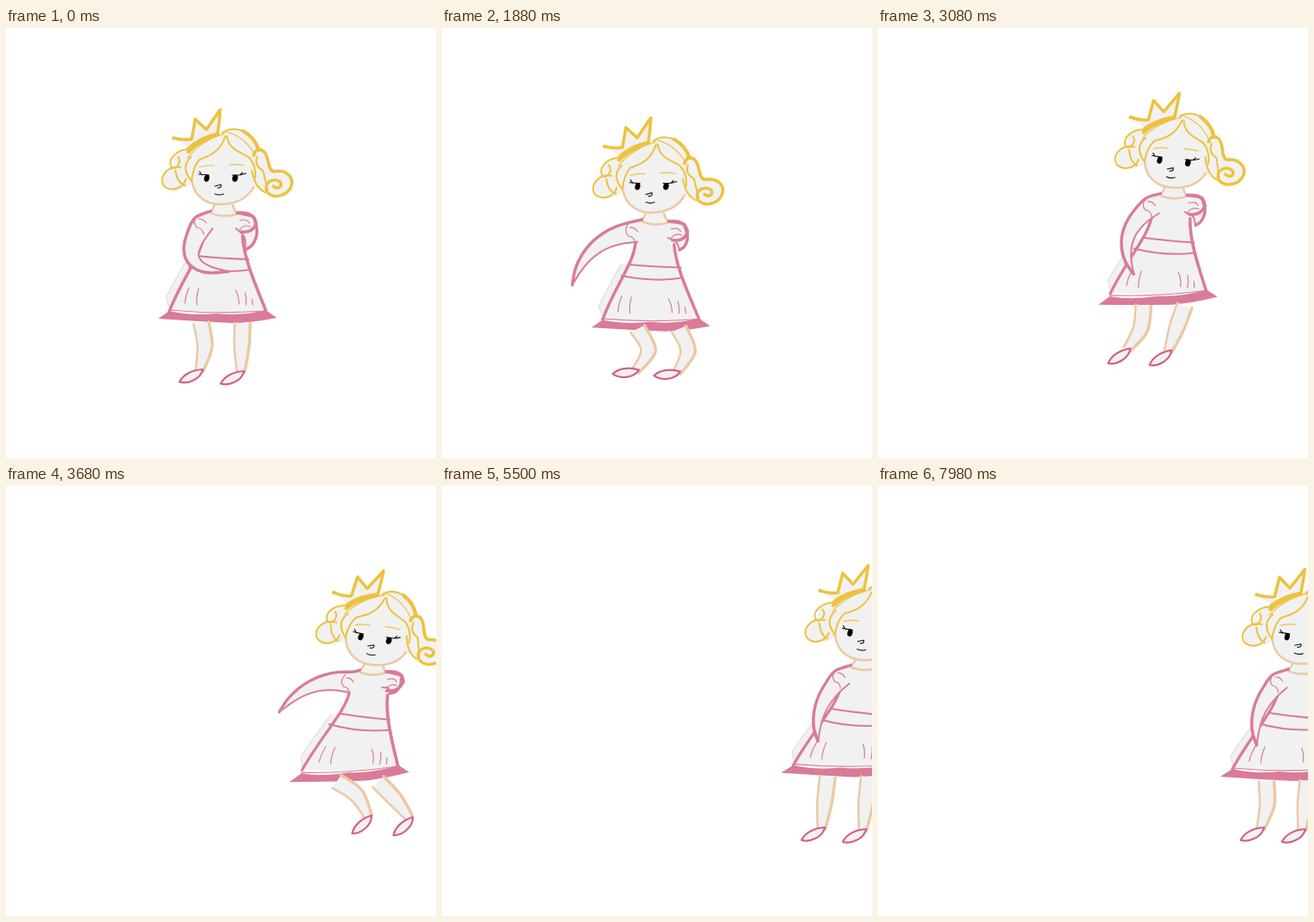
An HTML page for the animation above (8 s loop, 500 by 500 pixels).

```html
<!DOCTYPE html>
<html lang="en">
<head>
<meta charset="utf-8">
<title>Princess leap</title>
<style>
  html, body { margin: 0; width: 100%; height: 100%; overflow: hidden; background: #fff; }
  svg { display: block; width: 100vw; height: 100vh; }
  path { fill: none; stroke-linecap: round; stroke-linejoin: round; }
  .fill { fill: #f1f1f1; }
  .pink { stroke: #d97b99; stroke-width: 2; }
  .gold { stroke: #edc23c; stroke-width: 2; }
  .skin { stroke: #ebc9a3; stroke-width: 2.5; }
  .shoe { stroke: #d2608a; stroke-width: 2.2; fill: #f1f1f1; }
  .ink { stroke: #111; stroke-width: 1.1; }
  .ghost { stroke: #dcdcdc; stroke-width: 1; }
  .thin { stroke-width: 1.2; }
  .thick { stroke-width: 3.5; }
  .bold { stroke-width: 4.2; }
  .hem { fill: #d97b99; }
</style>
</head>
<body>
<svg viewBox="0 0 500 500">
  <g id="torso">
    <path class="fill" d="M243 204L238 214L222 220L224 235L230 241L224 264L211 265L186 312L190 329L302 331L283 270L275 242L287 236L287 220L269 215L264 204Z"/>
    <path class="ghost" d="M213 265C202 285 190 303 186 314L189 323"/>
    <path class="skin" d="M242 205Q242 211 237 213M264 206Q265 212 269 215M236 214Q251 222 270 216"/>
    <path id="waist" class="pink" d="M222 265Q250 268 282 269M213 278Q250 286 284 281"/>
    <path class="pink thick" d="M230 240C228 263 205 291 190 329M275 242C276 266 289 296 302 328"/>
    <path class="pink thin" d="M213 302Q209 310 208 320M224 303Q221 313 222 322M267 305Q271 312 271 321M278 308Q280 315 279 322M286 315L287 322"/>
    <g id="hem">
      <path class="hem" d="M177 338L190 329Q215 335 245 332Q275 335 302 328L315 337Q285 343 262 343Q220 341 177 338Z"/>
      <path class="pink thin" d="M190 328Q245 333 302 329"/>
    </g>
  </g>
  <g id="legs"></g>
  <g id="arms"></g>
  <g id="head">
    <path class="fill" d="M195 129L216 130L220 106L233 118L249 96L247 121Q258 114 273 119Q290 126 295 141Q305 144 307 163Q322 164 331 176Q331 192 315 195Q303 195 295 187L288 186Q278 204 252 205Q224 205 216 181Q207 189 191 188Q180 182 184 169Q188 162 195 158Q192 145 210 142L212 138Z"/>
    <path class="skin" d="M216 177C219 199 237 206 252 205C270 204 282 196 288 185"/>
    <path class="gold thick" d="M195 128Q208 131 216 129L220 106L233 118L249 95Q248 111 246 123C231 127 222 131 212 140"/>
    <path class="gold bold" d="M276 120Q289 127 294 142M246 124C229 130 219 136 212 144M195 128h.1"/>
    <path class="gold" d="M252 122Q262 114 276 120M255 126C248 146 235 149 225 153Q217 162 216 178M257 126C259 143 276 145 283 151Q291 160 290 174"/>
    <path class="gold thin" d="M254 123Q228 130 211 151M225 162Q233 159 242 160M260 159Q269 158 277 160M257 121Q279 127 290 149"/>
    <path class="gold" d="M213 141C199 141 188 152 192 161C196 168 206 156 200 150M203 162C185 160 177 176 184 184C192 191 206 187 209 176M197 166Q199 180 208 183M215 150Q202 162 216 178"/>
    <path class="gold thick" d="M288 148Q291 138 299 143C307 149 303 164 311 167C325 164 335 173 332 183C328 196 310 199 304 191C298 180 311 173 319 179C322 185 315 188 311 184"/>
    <path class="gold" d="M292 150Q288 160 299 166Q302 179 304 188M286 166Q289 185 301 191"/>
    <path class="ink" d="M236 171L224 170M228 171L225 167M263 171Q271 172 279 169M272 171L275 168M243 184L250 182Q251 186 246 186M243 193Q248 195 253 193"/>
    <ellipse cx="233.5" cy="174.5" rx="3" ry="4.2" transform="rotate(12 233 174)"/>
    <ellipse cx="266.5" cy="174.5" rx="3.2" ry="4.2" transform="rotate(12 266 174)"/>
  </g>
</svg>
<script>
const LOOP = 8000;

// Key moments; each property moves only between the keys that name it.
// arm: angle, reach and curl of the near arm; far arm: angle2, reach2.
// kick and lift move the feet away from their standing place.
const keys = {
  0:    { x: 0, y: 0, lean: 0, swing: 0, arm: 63, reach: 63, curl: 60, angle2: 88, reach2: 32, kick: 0, lift: 0 },
  1220: { y: 1, swing: -1, arm: 142, reach: 81, curl: 50, reach2: 14, kick: 4 },
  1700: { x: -4, y: 6, lean: -3, arm: 160, reach: 100, angle2: 88, reach2: 14, lift: 0 },
  2480: { x: 10, y: 23, lean: 3, swing: 2, arm: 15, reach: 77, curl: 18, angle2: 28, reach2: 77, kick: 1, lift: -4 },
  3290: { x: 108, y: -29, lean: 14, arm: 130, curl: 40, angle2: 88, reach2: 14, kick: -18, lift: 30 },
  3680: { x: 153, y: 1, lean: 20, swing: 4, arm: 156, reach: 85, curl: 27, reach2: 14, kick: 43, lift: 14 },
  4120: { x: 194 },
  4640: { x: 204, y: 21, swing: 5, arm: 100, reach: 57, curl: 50, reach2: 70, kick: 8, lift: 3 },
  5400: { x: 217, y: -5, lean: 20, swing: 0, arm: 102, reach: 76, curl: 22, reach2: 32, kick: -1, lift: 0 },
  6000: { y: 0 },
  7980: { x: 221, lean: 18 }
};
const tracks = {};
for (const [time, props] of Object.entries(keys))
  for (const [name, value] of Object.entries(props)) (tracks[name] ??= []).push([+time, value]);

// Smooth interpolation that never overshoots a key.
function slope(track, i) {
  if (i === 0 || i === track.length - 1) return 0;
  const rate = j => (track[j + 1][1] - track[j][1]) / (track[j + 1][0] - track[j][0]);
  const a = rate(i - 1), b = rate(i);
  return a * b <= 0 ? 0 : 2 * a * b / (a + b);
}
function valueAt(track, time) {
  const i = track.findIndex(([t]) => t > time) - 1;
  if (i < 0) return track[track.length - 1][1];
  const [t0, a] = track[i], [t1, b] = track[i + 1];
  const span = t1 - t0, u = (time - t0) / span, v = 1 - u;
  return a * (1 + 2 * u) * v * v + b * u * u * (3 - 2 * u) +
    span * u * v * (v * slope(track, i) - u * slope(track, i + 1));
}

// Rounded curve through the given points.
function curve(pts, start = 'M') {
  let d = start + pts[0];
  for (let i = 0; i < pts.length - 1; i++) {
    const p = pts[i - 1] || pts[i], a = pts[i], b = pts[i + 1], n = pts[i + 2] || b;
    d += `C${a[0] + (b[0] - p[0]) / 6} ${a[1] + (b[1] - p[1]) / 6} ` +
         `${b[0] - (n[0] - a[0]) / 6} ${b[1] - (n[1] - a[1]) / 6} ${b}`;
  }
  return d;
}

// One edge of a limb: its middle line moved sideways by the given widths.
const edge = (line, widths, side) => line.map(([x, y], i) => {
  const p = line[i - 1] || line[i], n = line[i + 1] || line[i];
  const dx = n[0] - p[0], dy = n[1] - p[1], w = side * widths[i] / Math.hypot(dx, dy);
  return [x - dy * w, y + dx * w];
});

const byId = id => document.getElementById(id);
function addPath(parent, cls, d = '') {
  const el = document.createElementNS('http://www.w3.org/2000/svg', 'path');
  el.setAttribute('class', cls);
  el.setAttribute('d', d);
  byId(parent).append(el);
  return el;
}
const makeLimb = (parent, cls) => ['fill', cls, cls + ' thick'].map(c => addPath(parent, c));
const setAll = (els, paths) => els.forEach((el, i) => el.setAttribute('d', paths[i]));
const drawLimb = (els, inner, outer) =>
  setAll(els, [curve(outer) + curve([...inner].reverse(), 'L') + 'Z', curve(inner), curve(outer)]);

const farArm = makeLimb('arms', 'pink');
addPath('arms', 'pink thick', 'M269 215Q288 213 291 227Q287 239 273 237');
addPath('arms', 'pink thin', 'M272 224Q280 221 283 227M272 234Q277 228 284 231');
const nearArm = makeLimb('arms', 'pink');
addPath('arms', 'pink thin', 'M222 218Q216 226 222 232Q229 233 230 240M224 222Q230 222 233 227');
const limbs = [0, 48].map(offset => ({ offset, leg: makeLimb('legs', 'skin'), shoe: addPath('legs', 'shoe') }));

const rad = deg => deg * Math.PI / 180;
const steps = Array.from({ length: 7 }, (_, i) => i / 6);

// A tapering arm that bows sideways by curl; it starts at the collar.
function drawArm(els, collar, [sx, sy], angle, reach, curl, side) {
  const c = Math.cos(rad(angle)), s = Math.sin(rad(angle));
  const line = steps.map(t => {
    const along = reach * t, bow = 2 * curl * t * (1 - t);
    return [sx + c * along - s * bow, sy + s * along + c * bow];
  });
  const widths = steps.map(t => 12 * (1 - t) ** 0.7);
  drawLimb(els, edge(line, widths, -side), [collar, ...edge(line, widths, side)]);
}

// The knee follows from the hip and ankle; the toes rise in a crouch.
function drawLeg({ offset, leg, shoe }, p) {
  const crouch = Math.max(p.y, 0);
  const hx = p.x + 227 + 0.4 * crouch + 0.2 * p.lean + offset, hy = 343 + p.y - 0.3 * crouch;
  const ax = p.x + 225 + p.kick + offset, ay = 398 - p.lift + offset / 24;
  const dx = ax - hx, dy = ay - hy, dist = Math.hypot(dx, dy);
  const bend = Math.sqrt(Math.max(0, 28 ** 2 - dist ** 2 / 4)) / dist;
  const knee = [(hx + ax) / 2 + dy * bend, (hy + ay) / 2 - dx * bend];
  const line = [[hx, hy], knee, [ax, ay]], widths = [9, 8.5, 4.5];
  drawLimb(leg, edge(line, widths, 1), edge(line, widths, -1));

  const toe = rad(152 + 2.1 * crouch - 0.4 * Math.abs(p.kick));
  const c = Math.cos(toe), s = Math.sin(toe), heel = [ax + 4, ay - 1];
  const at = (along, down) => `${heel[0] + c * along + s * down} ${heel[1] + s * along - c * down}`;
  shoe.setAttribute('d', `M${heel}C${at(12, -6)} ${at(24, -5)} ${at(31, 0)}C${at(24, 7)} ${at(8, 9)} ${heel}Z`);
}

function draw(time) {
  const p = {};
  for (const name in tracks) p[name] = valueAt(tracks[name], time);
  const place = (id, transform) => byId(id).setAttribute('transform', transform);
  const k = p.lean / 122;
  const bend = `matrix(1 0 ${-k} 1 ${p.x + 337 * k} ${p.y})`;
  place('torso', bend);
  place('arms', bend);
  place('waist', `rotate(${p.lean * 0.15} 250 272)`);
  place('hem', `rotate(${-1.1 * p.swing} 246 336)`);
  place('head', `translate(${p.x + p.lean * 1.08} ${p.y + p.lean * 0.1}) rotate(${p.lean * 0.2 + p.swing} 252 205)`);
  drawArm(nearArm, [238, 213], [230, 227], p.arm, p.reach, p.curl, 1);
  drawArm(farArm, [270, 215], [277, 226], p.angle2, p.reach2, -0.4 * p.reach2 * Math.sin(rad(p.angle2)) ** 2, -1);
  limbs.forEach(limb => drawLeg(limb, p));
}

const begin = performance.now();
function tick() {
  draw((performance.now() - begin) % LOOP);
  requestAnimationFrame(tick);
}
tick();
</script>
</body>
</html>
```
